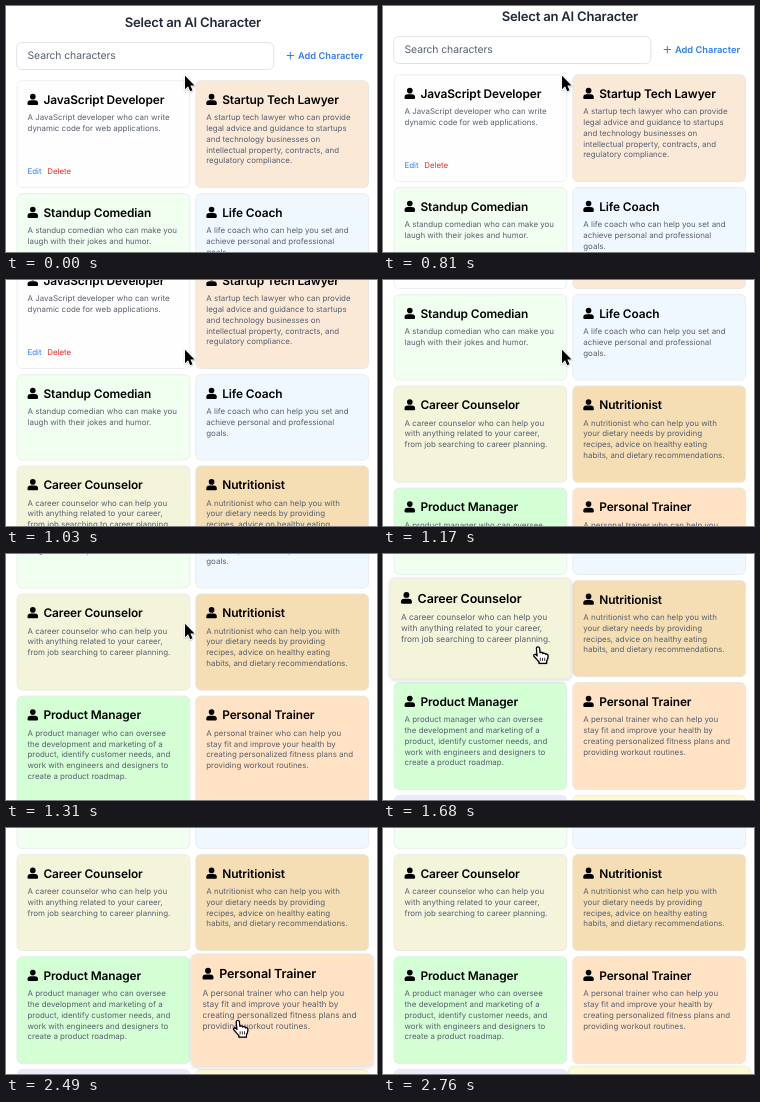
Write an HTML page with a canvas that moves like this. It is 371 by 246 pixels and loops after 3 s.

```html
<!DOCTYPE html>
<html lang="en">
<head>
<meta charset="utf-8">
<title>Select an AI Character</title>
<style>
html, body { margin: 0; width: 100%; height: 100%; overflow: hidden; background: #fff; }
canvas { display: block; width: 371px; height: 246px; }
</style>
</head>
<body>
<canvas id="stage"></canvas>
<script>
const W = 371, H = 246, LOOP = 3000, ZOOM = 0.672;
const FONT = 'Inter, "Open Sans", sans-serif';
const BLUE = '#2f7df6', RED = '#f02c2c', GRAY = '#586070';
const CARD_W = 258, GAP = 8, LEFT = 16, FIRST_ROW = 110.7;
const SMALL = 11.8;

const canvas = document.getElementById('stage');
const ctx = canvas.getContext('2d');
const dpr = window.devicePixelRatio || 1;
canvas.width = W * dpr;
canvas.height = H * dpr;

// Each row: height, then its two cards; hover holds the enter and leave times.
const rows = [
  [160,
    { title: 'JavaScript Developer', fill: '#fefefe', links: true, lines: [
      'A JavaScript developer who can write',
      'dynamic code for web applications.'] },
    { title: 'Startup Tech Lawyer', fill: '#fae9d7', lines: [
      'A startup tech lawyer who can provide',
      'legal advice and guidance to startups',
      'and technology businesses on',
      'intellectual property, contracts, and',
      'regulatory compliance.'] }],
  [128,
    { title: 'Standup Comedian', fill: '#f0fff0', lines: [
      'A standup comedian who can make you',
      'laugh with their jokes and humor.'] },
    { title: 'Life Coach', fill: '#f0f8ff', lines: [
      'A life coach who can help you set and',
      'achieve personal and professional',
      'goals.'] }],
  [144,
    { title: 'Career Counselor', fill: '#f4f4db', hover: [1568, 1790], lines: [
      'A career counselor who can help you',
      'with anything related to your career,',
      'from job searching to career planning.'] },
    { title: 'Nutritionist', fill: '#f5deb3', lines: [
      'A nutritionist who can help you with',
      'your dietary needs by providing',
      'recipes, advice on healthy eating',
      'habits, and dietary recommendations.'] }],
  [160,
    { title: 'Product Manager', fill: '#d4ffd5', hover: [1790, 2075], lines: [
      'A product manager who can oversee',
      'the development and marketing of a',
      'product, identify customer needs, and',
      'work with engineers and designers to',
      'create a product roadmap.'] },
    { title: 'Personal Trainer', fill: '#ffe3c4', hover: [2075, 2595], lines: [
      'A personal trainer who can help you',
      'stay fit and improve your health by',
      'creating personalized fitness plans and',
      'providing workout routines.'] }],
  [160,
    { fill: '#ebeafa' },
    { fill: '#fffacd', hover: [2595, 9999] }]
];

const cards = [];
let rowTop = FIRST_ROW;
for (const [h, ...pair] of rows) {
  pair.forEach((card, i) => cards.push({ ...card, x: LEFT + i * (CARD_W + GAP), y: rowTop, h }));
  rowTop += h + GAP;
}

const scrollKeys = [[782, 0], [810, 6], [1034, 93], [1314, 239], [1398, 252.5]];
const cursorX = [[1566, 179], [1678, 155], [1790, 143], [1900, 141], [2040, 168],
  [2098, 226], [2140, 231], [2470, 231], [2600, 248], [2680, 254]];
const cursorY = [[1566, 69.8], [1678, 93], [1790, 126], [1900, 160], [2040, 187],
  [2098, 189], [2140, 190], [2470, 190], [2600, 247], [2680, 280]];

// Monotone cubic interpolation through [time, value] keys.
function curve(keys, t) {
  const n = keys.length - 1;
  if (t <= keys[0][0]) return keys[0][1];
  if (t >= keys[n][0]) return keys[n][1];
  let i = 0;
  while (t > keys[i + 1][0]) i++;
  const chord = j => (keys[j + 1][1] - keys[j][1]) / (keys[j + 1][0] - keys[j][0]);
  const slope = j => {
    if (j === 0 || j === n) return 0;
    const a = chord(j - 1), b = chord(j);
    return a * b > 0 ? 2 * a * b / (a + b) : 0;
  };
  const [t0, v0] = keys[i], [t1, v1] = keys[i + 1];
  const d = t1 - t0, u = (t - t0) / d, w = 1 - u;
  return v0 * (1 + 2 * u) * w * w + slope(i) * d * u * w * w
    + v1 * u * u * (3 - 2 * u) - slope(i + 1) * d * u * u * w;
}

// The CSS "ease" timing function.
function ease(x) {
  if (x <= 0) return 0;
  if (x >= 1) return 1;
  let lo = 0, hi = 1;
  for (let i = 0; i < 20; i++) {
    const s = (lo + hi) / 2;
    if (0.75 * s * (1 - s) + s * s * s < x) lo = s; else hi = s;
  }
  return 0.3 * lo * (1 - lo) ** 2 + 3 * lo * lo * (1 - lo) + lo ** 3;
}

function hoverAmount(card, t) {
  if (!card.hover) return 0;
  const [enter, leave] = card.hover;
  return ease((t - enter) / 150) - ease((t - leave) / 150);
}

function text(str, x, y, size, color, weight = 400, spacing = 0, align = 'left') {
  ctx.font = `${weight} ${size}px ${FONT}`;
  ctx.letterSpacing = spacing + 'px';
  ctx.textRendering = 'geometricPrecision';
  ctx.textAlign = align;
  ctx.fillStyle = color;
  ctx.fillText(str, x, y);
}

function box(x, y, w, h, r) {
  ctx.beginPath();
  ctx.roundRect(x, y, w, h, r);
}

function drawHeader() {
  text('Select an AI Character', 278, 30.6, 19.5, '#1f2937', 600, -0.34, 'center');
  box(15.9, 54.5, 382.6, 40, 7.5);
  ctx.strokeStyle = '#d1d5db';
  ctx.lineWidth = 1;
  ctx.stroke();
  text('Search characters', 32, 79.6, 15.5, GRAY, 400, -0.16);
  ctx.strokeStyle = BLUE;
  ctx.lineWidth = 1.5;
  ctx.beginPath();
  ctx.moveTo(417.7, 73.8);
  ctx.lineTo(428.5, 73.8);
  ctx.moveTo(423.1, 68.4);
  ctx.lineTo(423.1, 79.2);
  ctx.stroke();
  text('Add Character', 434.4, 78.4, 13.85, BLUE, 600);
}

function drawPerson(x, y) {
  ctx.fillStyle = '#000';
  ctx.beginPath();
  ctx.arc(x + 7.9, y + 4.2, 4.2, 0, 7);
  ctx.fill();
  box(x, y + 9.5, 15.75, 7.1, [4.9, 4.9, 1.6, 1.6]);
  ctx.fill();
}

function drawCard(card, amount) {
  const { x, y, h } = card;
  const cx = x + CARD_W / 2, cy = y + h / 2, s = 1 + 0.05 * amount;
  ctx.save();
  ctx.translate(cx, cy);
  ctx.scale(s, s);
  ctx.translate(-cx, -cy);

  ctx.save();
  ctx.shadowColor = `rgba(0,0,0,${0.15 * amount})`;
  ctx.shadowBlur = 4 * dpr;
  ctx.shadowOffsetY = 1.3 * dpr;
  ctx.fillStyle = card.fill;
  box(x, y, CARD_W, h, 8);
  ctx.fill();
  ctx.restore();
  box(x + 0.5, y + 0.5, CARD_W - 1, h - 1, 7.5);
  ctx.strokeStyle = '#e5e7eb';
  ctx.lineWidth = 1;
  ctx.stroke();

  if (card.title) {
    drawPerson(x + 16, y + 20);
    text(card.title, x + 39.75, y + 35.1, 17.7, '#000', 600, -0.17);
    card.lines.forEach((line, i) => text(line, x + 16, y + 59.5 + 16 * i, SMALL, GRAY));
  }
  if (card.links) {
    text('Edit', x + 16, y + 138.8, SMALL, BLUE);
    text('Delete', x + 45.3, y + 138.8, SMALL, RED);
  }
  ctx.restore();
}

const arrow = new Path2D('M0 0V13.4L3.1 10.5L5.2 15.5L7.5 14.5L5.4 9.7H9.5Z');
const hand = new Path2D('M-1.6 1.3C-1.6 -.5 1.4 -.5 1.5 1.3L2 6C2.5 5 4.6 5.2 4.8 6.7'
  + 'C5.4 5.7 7.3 6 7.5 7.5C8.3 6.7 10 7.2 10 8.9C10.1 11.5 9.4 12.6 8.6 14V16.4H1.2V15'
  + 'C-.6 13.2 -2 11.4 -3.9 9.4C-4.9 7.9 -3 6.7 -1.8 8L-.8 9Z');
const creases = new Path2D('M2.3 10.8V13.9M4.5 10.8V13.9M6.7 10.8V13.9');

function drawCursor(t) {
  if (t > 2700) return;
  ctx.save();
  ctx.translate(curve(cursorX, t), curve(cursorY, t));
  ctx.lineJoin = 'round';
  ctx.shadowColor = 'rgba(0,0,0,0.25)';
  ctx.shadowBlur = 1.5 * dpr;
  ctx.shadowOffsetY = 0.6 * dpr;
  const over = t > 1580;
  const shape = over ? hand : arrow;
  ctx.strokeStyle = over ? '#000' : '#fff';
  ctx.lineWidth = over ? 1.1 : 1.7;
  ctx.stroke(shape);
  ctx.shadowColor = 'transparent';
  ctx.fillStyle = over ? '#fff' : '#000';
  ctx.fill(shape);
  if (over) {
    ctx.stroke(shape);
    ctx.lineWidth = 0.8;
    ctx.stroke(creases);
  }
  ctx.restore();
}

function draw(now) {
  // The motion advances in even ticks of 28 ms.
  const t = 810 + 28 * Math.floor((now % LOOP - 802) / 28);
  ctx.setTransform(dpr, 0, 0, dpr, 0, 0);
  ctx.fillStyle = '#fff';
  ctx.fillRect(0, 0, W, H);
  ctx.save();
  ctx.translate(0, -curve(scrollKeys, t));
  ctx.scale(ZOOM, ZOOM);
  drawHeader();
  cards.map(card => [card, hoverAmount(card, t)])
    .sort((a, b) => a[1] - b[1])
    .forEach(([card, amount]) => drawCard(card, amount));
  ctx.restore();
  drawCursor(t);
}

const start = performance.now();
function tick() {
  draw(performance.now() - start);
  requestAnimationFrame(tick);
}
tick();
</script>
</body>
</html>
```
